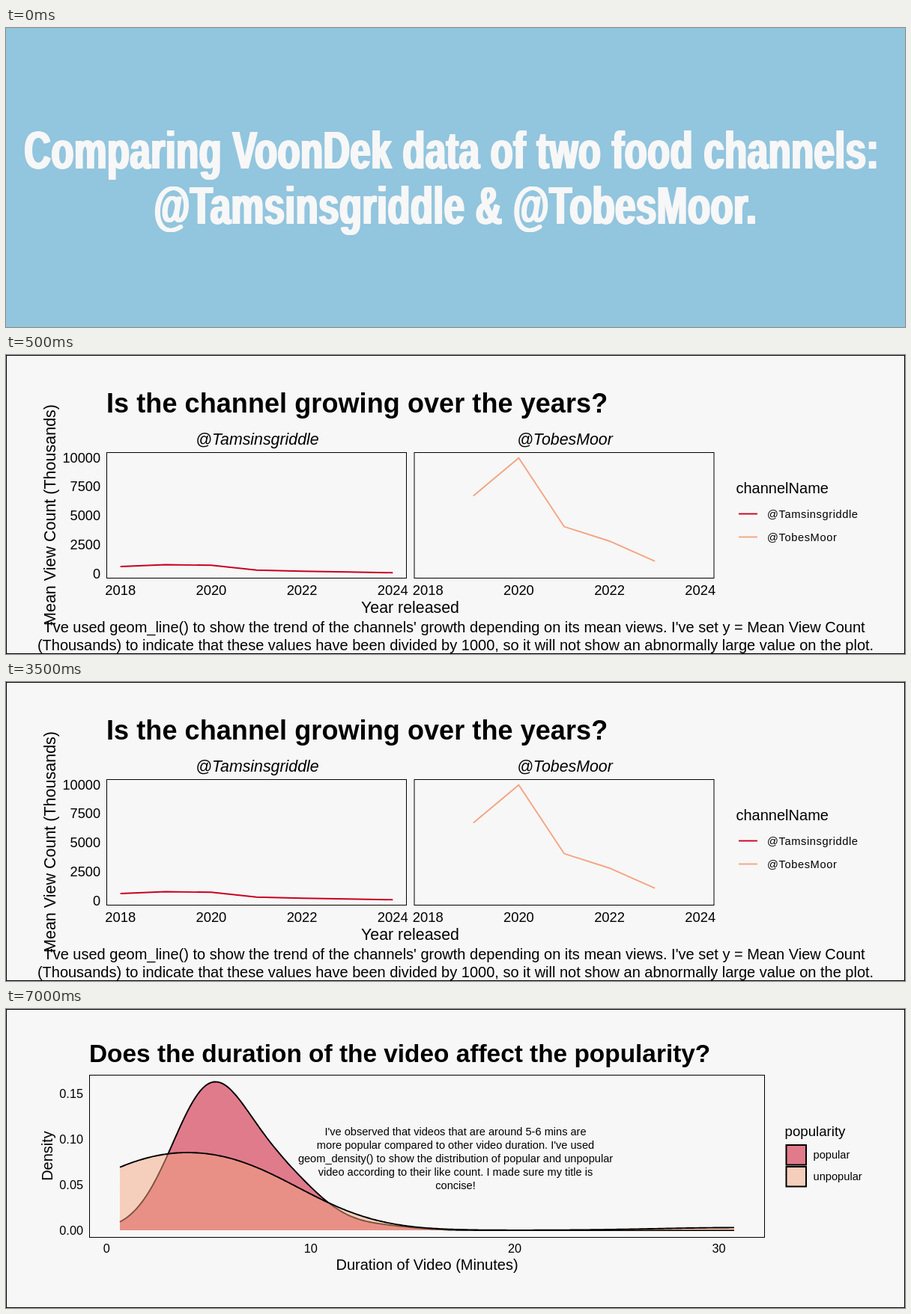
Animation of 1200x400 px, one loop 8 s. Source, as an HTML page:

```html
<!DOCTYPE html>
<html lang="en">
<head>
<meta charset="utf-8">
<title>Food channel comparison</title>
<style>
  html, body { margin: 0; width: 100%; height: 100%; overflow: hidden; }
  svg { display: block; width: 1200px; height: 400px; font-family: "Liberation Sans", Arial, sans-serif; }
  .heading { font-weight: bold; fill: #f7f7f7; letter-spacing: 1px; }
</style>
</head>
<body>
<svg viewBox="0 0 1200 400"></svg>
<script>
const INK = '#000', PAPER = '#f7f7f7', BLUE = '#92c5de', RED = '#ca0020', PEACH = '#f4a582';
const CHANNELS = ['@Tamsinsgriddle', '@TobesMoor'];

const range = (n, fn) => Array.from({ length: n }, (_, i) => fn(i));
const text = (x, y, size, str, anchor = 'start', extra = '') =>
  `<text x="${x}" y="${y}" font-size="${size}" text-anchor="${anchor}" ${extra}>${str.replace(/&/g, '&amp;')}</text>`;
const upright = (x, y, size, str) => text(0, 0, size, str, 'middle', `transform="translate(${x} ${y}) rotate(-90)"`);
const box = (x, y, w, h, fill = 'none', line = 1) =>
  `<rect x="${x}" y="${y}" width="${w}" height="${h}" fill="${fill}" stroke="${INK}" stroke-width="${line}"/>`;
const curve = (points, stroke) =>
  `<path d="M${points.join('L')}" fill="none" stroke="${stroke}" stroke-width="1.9"/>`;
const page = box(0.5, 0.5, 1199, 399, PAPER);

// Heavy condensed lettering: one condensing factor, stems thickened sideways
function heading(x, y, str) {
  const look = `transform="translate(${x} ${y}) scale(.697 1)" class="heading"`;
  return range(5, i => text(i * 1.1 - 2.2, 0, 70, str, 'middle', look)).join('');
}

function intro() {
  return `<rect width="1200" height="400" fill="${BLUE}"/>` +
    heading(595, 187.5, 'Comparing VoonDek data of two food channels:') +
    heading(600, 261.5, CHANNELS.join(' & ') + '.');
}

function growth() {
  const yearX = (panel, year) => 152.7 + panel * 410.5 + (year - 2018) * 60.6;
  const viewY = views => 292 - views * 0.0155;
  const series = [
    { from: 2018, color: RED, views: [580, 740, 690, 270, 175, 110, 45] },
    { from: 2019, color: PEACH, views: [6680, 9950, 4030, 2775, 1045] }
  ];
  const panels = series.map(({ from, color, views }, i) => {
    const left = 134.5 + i * 410.5, keyY = 212.5 + i * 31;
    return box(left, 130.5, 400, 168) +
      text(left + 201, 120, 21.33, CHANNELS[i], 'middle', 'font-style="italic"') +
      range(4, k => text(yearX(i, 2018 + 2 * k), 320.5, 18.4, String(2018 + 2 * k), 'middle')).join('') +
      curve(views.map((v, k) => [yearX(i, from + k), viewY(v)]), color) +
      curve([[978, keyY], [1003, keyY]], color) +
      text(1016, keyY + 5.5, 14.67, CHANNELS[i], 'start', 'letter-spacing=".6"');
  });
  return page + panels.join('') +
    range(5, k => text(126, viewY(k * 2500) + 6.5, 18.2, String(k * 2500), 'end')).join('') +
    text(134, 77, 36, 'Is the channel growing over the years?', 'start', 'font-weight="bold" letter-spacing=".08"') +
    text(539.5, 345, 21.33, 'Year released', 'middle') +
    upright(66, 214, 21.5, 'Mean View Count (Thousands)') +
    text(974.5, 185, 20, 'channelName') +
    text(600, 371, 20, "I've used geom_line() to show the trend of the channels' growth depending on its mean views. I've set y = Mean View Count", 'middle') +
    text(600, 395, 20, '(Thousands) to indicate that these values have been divided by 1000, so it will not show an abnormally large value on the plot.', 'middle');
}

// Sum of bell curves, each given as [height, centre, spread]
const bells = (list, m) => list.reduce((sum, [h, c, s]) => sum + h * Math.exp(-(((m - c) / s) ** 2) / 2), 0);

function density() {
  const minuteX = m => 134.3 + m * 27.24, base = 296;
  const groups = [
    { name: 'popular', color: RED, shape: [[178, 5, 1.85], [72, 8.4, 2.05], [5, 13.6, 1.5]] },
    { name: 'unpopular', color: PEACH, shape: [[69, 1.35, 3.6], [68, 6.7, 3.6], [3.6, 31, 4]] }
  ];
  const note = ["I've observed that videos that are around 5-6 mins are",
    "more popular compared to other video duration. I've used",
    'geom_density() to show the distribution of popular and unpopular',
    'video according to their like count. I made sure my title is',
    'concise!'];
  const areas = groups.map(({ name, color, shape }, i) => {
    const points = range(302, k => {
      const m = 0.65 + k / 10;
      return [minuteX(m), base - bells(shape, m)];
    });
    const keyY = 182 + i * 29;
    return `<path d="M152,${base}L${points.join('L')}V${base}Z" fill="${color}80"/>` + curve(points, INK) +
      box(1041.5, keyY, 26.5, 26.5, color + '80', 2) + text(1077.5, keyY + 18, 14.67, name);
  });
  return page + areas.join('') + box(111.5, 88.5, 901, 217) +
    text(111, 71, 33.4, 'Does the duration of the video affect the popularity?', 'start', 'font-weight="bold"') +
    range(4, k => text(103, 301.5 - k * 60.8, 16.3, (k * 0.05).toFixed(2), 'end') +
      text(minuteX(k * 10), 326, 16.3, String(k * 10), 'middle')).join('') +
    note.map((line, i) => text(600, 168.8 + i * 18.1, 14.6, line, 'middle')).join('') +
    text(562, 349, 20, 'Duration of Video (Minutes)', 'middle') +
    upright(62, 196.5, 20, 'Density') +
    text(1039.5, 170, 18.67, 'popularity');
}

const svg = document.querySelector('svg');
svg.innerHTML = [intro, growth, density].map(scene => `<g>${scene()}</g>`).join('');
const scenes = [...svg.children], starts = [0, 500, 5500];
const began = performance.now();

function draw(now) {
  const t = Math.max(0, now - began) % 8000;
  const current = starts.filter(s => s <= t).length - 1;
  scenes.forEach((g, i) => g.style.display = i === current ? '' : 'none');
  requestAnimationFrame(draw);
}
draw(began);
</script>
</body>
</html>
```
